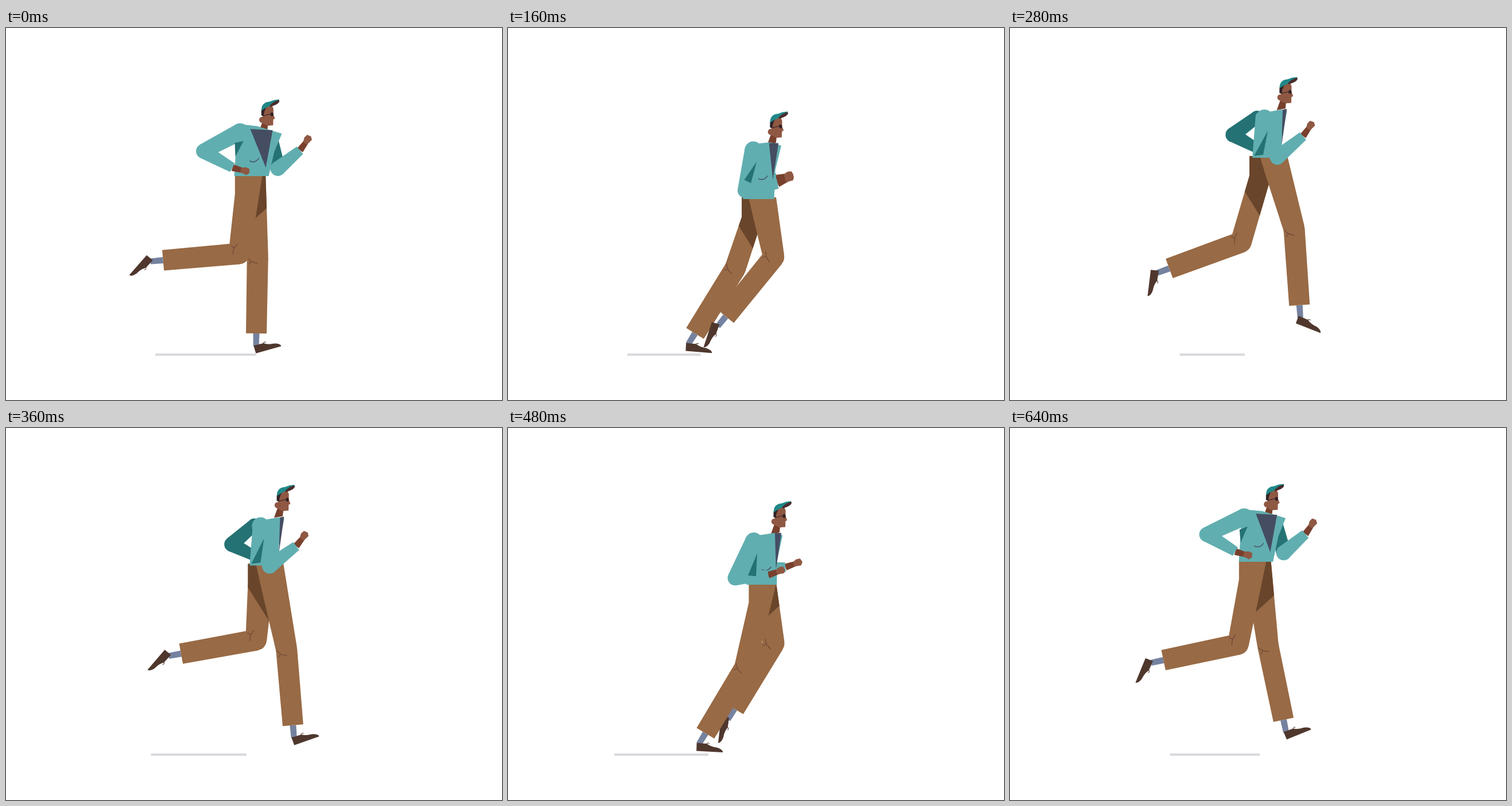
An HTML page with a canvas for the animation above (0.68 s loop, 864x648 px).

```html
<!DOCTYPE html>
<html lang="en">
<head>
<meta charset="utf-8">
<title>Runner</title>
<style>
html, body { margin: 0; width: 100%; height: 100%; overflow: hidden; background: #fff; }
canvas { display: block; }
</style>
</head>
<body>
<canvas id="stage" width="864" height="648"></canvas>
<script>
const ctx = document.getElementById('stage').getContext('2d');
const PERIOD = 680, STEP = 40, CUFF_FLOOR = 532, SHIN = 133;

const C = {
  pants: '#986a45', pantsShade: '#69452b', jacket: '#61aeb0', jacketShade: '#247274',
  shirt: '#454d62', sock: '#75829f', shoe: '#4f372d', skin: '#8f5843', wrist: '#78402d',
  cap: '#208888', brim: '#4a2c2d', hair: '#302226', crease: '#65403a', ground: '#d9d9df'
};

// One stride, shared by both legs: time, thigh angle, thigh length, shin angle, shoe angle.
const STRIDE = [
  [0, -7, 137, -85, 130], [160, 11, 104, -39, 107], [280, 16, 130, 4, 20], [330, 14, 145, 15, -22],
  [400, 6, 153, -13, -9], [480, -12, 149, -31, 2], [560, -17, 157, -59, 74], [640, -10, 147, -78, 111]];
// Bounce: time, ear height, waist height.
const BOUNCE = [
  [0, 160, 257], [160, 181, 297], [280, 121, 225], [400, 146, 251],
  [480, 163, 272], [560, 140, 243], [600, 118, 217], [640, 133, 232]];

const rad = deg => deg * Math.PI / 180;
const wave = (t, mean, amp, peak, k = 1) =>
  mean + amp * Math.cos(k * 2 * Math.PI * (t - peak) / PERIOD);
// Angles hang from straight down and grow forwards.
const swing = (x, y, len, deg) => [x + len * Math.sin(rad(deg)), y + len * Math.cos(rad(deg))];

// Periodic cubic through keys of the form [time, ...values].
function spline(keys, time) {
  const t = (time % PERIOD + PERIOD) % PERIOD, n = keys.length;
  const key = (k, j) => keys[(k + n) % n][j] + (j ? 0 : Math.floor(k / n) * PERIOD);
  let i = n - 1;
  while (keys[i][0] > t) i--;
  const span = key(i + 1, 0) - key(i, 0), u = (t - key(i, 0)) / span;
  return keys[0].map((_, j) => {
    const slope = k => (key(k + 1, j) - key(k - 1, j)) / (key(k + 1, 0) - key(k - 1, 0));
    const a = key(i, j), b = key(i + 1, j);
    return a + (b - a) * u * u * (3 - 2 * u) +
      span * u * (1 - u) * ((1 - u) * slope(i) - u * slope(i + 1));
  }).slice(1);
}

function trace(p) {
  ctx.beginPath();
  for (let i = 0; i < p.length; i += 2) ctx.lineTo(p[i], p[i + 1]);
  ctx.closePath();
}

function poly(p, color) {
  trace(p);
  ctx.fillStyle = color;
  ctx.fill();
}

function disc(x, y, r, color) {
  ctx.beginPath();
  ctx.arc(x, y, r, 0, 7);
  ctx.fillStyle = color;
  ctx.fill();
}

function limb(x0, y0, x1, y1, w0, w1, color) {
  const len = Math.hypot(x1 - x0, y1 - y0) || 1;
  const nx = (y1 - y0) / len / 2, ny = (x0 - x1) / len / 2;
  poly([x0 + nx * w0, y0 + ny * w0, x1 + nx * w1, y1 + ny * w1,
    x1 - nx * w1, y1 - ny * w1, x0 - nx * w0, y0 - ny * w0], color);
}

function fillPath(d, color) {
  ctx.fillStyle = color;
  ctx.fill(new Path2D(d));
}

function strokePath(d, color, width) {
  ctx.strokeStyle = color;
  ctx.lineWidth = width;
  ctx.stroke(new Path2D(d));
}

function at(x, y, angle, draw) {
  ctx.save();
  ctx.translate(x, y);
  ctx.rotate(angle);
  draw();
  ctx.restore();
}

function drawLeg(x, y, phase, lean, shadeAngle) {
  const [swingAngle, reach, shin, shoe] = spline(STRIDE, phase);
  const angle = swingAngle + lean;
  // The thigh shortens so that the foot never sinks into the ground.
  const room = (CUFF_FLOOR - y - SHIN * Math.cos(rad(shin))) / Math.cos(rad(angle));
  const len = Math.min(reach, room);
  const [kx, ky] = swing(x, y, len, angle);
  const [cx, cy] = swing(kx, ky, SHIN, shin);
  const [ax, ay] = swing(cx, cy, 22, shin);

  limb(cx, cy, ax, ay, 11, 10, C.sock);
  at(ax, ay, rad(shoe), () => {
    ctx.translate(-4, 12);
    fillPath('M0 0V-14L18 -13Q24 -8 36 -7Q46 -4 46 1Z', C.shoe);
    strokePath('M17 -13q4 -3 5 0', C.shoe, 1);
  });

  const nx = 18.5 * Math.cos(rad(angle)), ny = -18.5 * Math.sin(rad(angle));
  const seat = Math.max(x - 24, x - 24 + (kx - nx - x + 24) * 32 / len);
  const thigh = [x - 24, y - 2, x + 24, y - 2, kx + nx, ky + ny, kx - nx, ky - ny, seat, y + 32];
  poly(thigh, C.pants);
  disc(kx, ky, 18.3, C.pants);
  limb(kx, ky, cx, cy, 37, 36, C.pants);
  at(kx, ky, rad(-shin), () =>
    strokePath('M-17 1Q-11 10 0 11M-15 13L-11 8', C.crease, 1));

  if (!shadeAngle) return;
  ctx.save();
  trace(thigh);
  ctx.clip();
  at(...swing(x, y, len * 0.53, angle), rad(shadeAngle), () => {
    ctx.fillStyle = C.pantsShade;
    ctx.fillRect(-150, -150, 300, 150);
  });
  ctx.restore();
}

function drawArm(sx, sy, upperAngle, foreAngle, upperLen, foreLen, width, upper, lowerColor) {
  const [ex, ey] = swing(sx, sy, upperLen, upperAngle);
  const [cx, cy] = swing(ex, ey, foreLen, foreAngle);
  const [hx, hy] = swing(cx, cy, 24, foreAngle + 14);
  const lower = lowerColor(ex);
  limb(cx, cy, hx, hy, 12, 8, C.wrist);
  at(hx, hy, rad(76 - foreAngle), () =>
    poly([-9, -4, -2, -7, 5, -6, 7, 1, 3, 6, -9, 4], C.skin));
  disc(sx, sy, width / 2, upper);
  limb(sx, sy, ex, ey, width, 26, upper);
  disc(ex, ey, 13, lower);
  limb(ex, ey, cx, cy, 26, 17, lower);
}

function drawHead(x, y) {
  at(x, y, 0.02, () => {
    poly([0, 4, 10, 8, 9, 19, -6, 22], C.wrist);
    poly([1, -8, 5, -22, 16, -26, 19, -20, 19, -10, 22, -3, 19, -1, 19, 9, 9, 10, 0, 6], C.skin);
    disc(0, 0, 5.5, C.skin);
    fillPath('M-2 -17L7 -23Q2 -14 2 -6L-2 -8Z', C.hair);
    fillPath('M-2 -16C-2 -28 4 -31 12 -32Q20 -36 28 -36L29 -34Q20 -28 14 -25Q6 -22 -2 -16Z', C.cap);
    fillPath('M13 -26Q20 -33 28 -35Q31 -32 25 -28Q18 -24 13 -23Z', C.brim);
    strokePath('M1 -7L17 -11', C.hair, 1);
    ctx.beginPath();
    ctx.ellipse(16.5, -10, 2.6, 3.4, 0, 0, 7);
    ctx.fillStyle = C.hair;
    ctx.fill();
  });
}

// The chest turns towards the viewer as open goes from 0 to 1.
function drawTorso(x, y, waist, open) {
  poly([x - 43, y + 29 - 22 * open, x + 2 - 11 * open, y + 21 - 10 * open,
    x + 11 + 23 * open, y + 24, x + 2 + 19 * open, y + 70 - 15 * open,
    x + 3 + 8 * open, waist + 1, x - 49, waist + 1], C.jacket);
  poly([x + 4 - 25 * open, y + 21 - 5 * open, x + 11 + 7 * open, y + 20 - 2 * open,
    x + 2 + 4 * open, y + 83], C.shirt);
  at(x - 15, y + 80 - 14 * open, -0.15, () => strokePath('M-8 4Q0 11 9 2', C.shirt, 1.4));
}

function draw(t) {
  ctx.fillStyle = '#fff';
  ctx.fillRect(0, 0, 864, 648);
  const width = wave(t, 150, 33, 60, 2) + wave(t, 0, 18, 580);
  ctx.fillStyle = C.ground;
  ctx.fillRect(wave(t, 312, 45, 305, 2) - width / 2, 567, width, 4);

  const x = wave(t, 460, 13.5, 345);
  const [y, waist] = spline(BOUNCE, t);
  const open = wave(t, 0.5, 0.5, 0) ** 2;
  const hip = wave(t, 2.5, 6.5, 270);
  const upperArm = (time, mean, amp) => wave(time, mean, amp, 300);
  const foreArm = time => wave(time, 95, 36, 310);
  const opposite = t + PERIOD / 2;

  drawArm(wave(t, x - 13, 30, 660), y + 34, upperArm(opposite, -20, 34), foreArm(opposite),
    52, 50, 22, C.jacketShade, elbow => elbow < x - 60 ? C.jacketShade : C.jacket);
  drawLeg(x - 21 - hip, waist, t + wave(t, 355, 38, 560), wave(t, -3, -3, 20),
    wave(t, 0, 1, 270) > 0 ? 58 : -42);
  drawLeg(x - 21 + hip, waist, t, 0);

  drawHead(x, y);
  drawTorso(x, y, waist, open);
  const sx = wave(t, x - 34, 6, 270), sy = y + 36 - 15 * open;
  drawArm(sx, sy, upperArm(t, -23, 42), foreArm(t), 72, 58, 30, C.jacket, () => C.jacket);
  poly([sx + 6, sy + 22 - 6 * open, x - 30 - 17 * open, y + 100 - 36 * open,
    x - 46 - 2 * open, y + 102 - 62 * open], C.jacketShade);
}

function tick() {
  draw(Math.floor(performance.now() % PERIOD / STEP) * STEP);
  requestAnimationFrame(tick);
}
tick();
</script>
</body>
</html>
```
